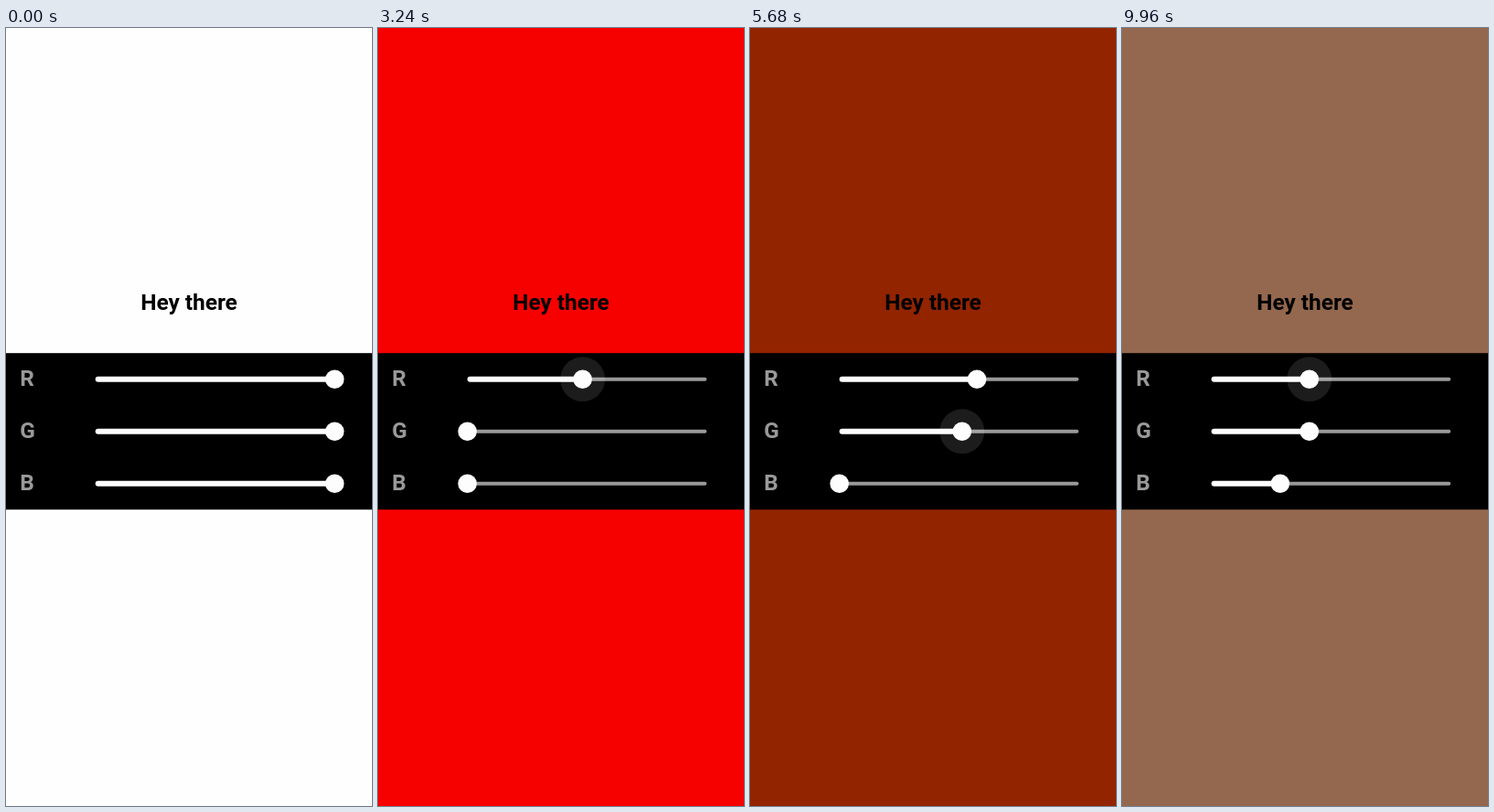
Animation of 400x850 px, one loop 10000 ms. Source, as an HTML page:

```html
<!DOCTYPE html>
<html lang="en">
<head>
<meta charset="utf-8">
<title>Colour sliders</title>
<style>
  html, body { margin: 0; width: 100%; height: 100%; overflow: hidden; }
  svg { display: block; width: 100vw; height: 100vh; }
  text { font: 700 24.4px Roboto, sans-serif; }
  .label { fill: #999; }
  .rail { stroke: #999; stroke-width: 4; stroke-linecap: round; }
  .fill { stroke: #fdfdfd; stroke-width: 6; stroke-linecap: round; }
  .thumb { fill: #fdfdfd; }
  .halo { fill: #fff; }
</style>
</head>
<body>
<svg id="stage" viewBox="0 0 400 850">
  <rect id="back" width="400" height="850"/>
  <text x="200" y="307.7" text-anchor="middle">Hey there</text>
  <rect y="355.2" width="400" height="171"/>
</svg>
<script>
const LOOP = 10000, STEP = 40;
const LEFT = 97.7, SPAN = 261.5, TOP = 383.7, ROW = 57;
const FULL = 254;
const LAG = 380;              // the backdrop settles this long after the thumb
const HOLD = 120, FADE = 80;  // halo after a drag
const TAP = 100;              // shorter touches show no halo

const drags = [
  { on: 'B', at: 1040, dur: 430, to: 0 },
  { on: 'G', at: 2080, dur: 600, to: 0 },
  { on: 'R', at: 3160, dur: 370, to: 0 },
  { on: 'R', at: 4640, dur: 560, to: 146 },
  { on: 'G', at: 5392, dur: 490, to: 140 },
  { on: 'B', at: 6240, dur: 560, to: 202 },
  { on: 'G', at: 7160, dur: 560, to: 34 },
  { on: 'R', at: 8190, dur: 40, to: 190 },
  { on: 'G', at: 8720, dur: 400, to: 104 },
  { on: 'B', at: 9274, dur: 400, to: 73 },
  { on: 'R', at: 9580, dur: 380, to: 104 }
];

const stage = document.getElementById('stage');
const back = document.getElementById('back');
const clamp = x => Math.max(0, Math.min(1, x));
const easeOut = p => 1 - (1 - p) ** 3;
const easeInOut = p => p * p * (3 - 2 * p);

function set(node, attrs) {
  for (const key in attrs) node.setAttribute(key, attrs[key]);
}

function add(tag, attrs) {
  const node = document.createElementNS('http://www.w3.org/2000/svg', tag);
  set(node, attrs);
  return stage.appendChild(node);
}

function level(moves, t, ease, lag) {
  return moves.reduce((value, { at, dur, to }) =>
    value + (to - value) * ease(clamp((t - at) / (dur + lag))), FULL);
}

function pressure(moves, t) {
  return Math.max(...moves.filter(m => m.dur > TAP).map(({ at, dur }) =>
    Math.min(clamp((t - at) / FADE), clamp((at + dur + HOLD + FADE - t) / FADE))));
}

const channels = [...'RGB'].map((name, i) => {
  const y = TOP + ROW * i;
  add('text', { class: 'label', x: 15.3, y: y + 7.6 }).textContent = name;
  add('line', { class: 'rail', x1: LEFT + 2, x2: LEFT + SPAN - 2, y1: y, y2: y });
  return {
    moves: drags.filter(d => d.on === name),
    bar: add('line', { class: 'fill', x1: LEFT + 3, y1: y, y2: y }),
    halo: add('circle', { class: 'halo', cy: y, r: 24.4 }),
    knob: add('circle', { class: 'thumb', cy: y, r: 10.3 })
  };
});

function draw(t) {
  const rgb = channels.map(({ moves, bar, halo, knob }) => {
    const x = LEFT + SPAN * level(moves, t, easeOut, 0) / FULL;
    set(bar, { x2: Math.max(LEFT + 3, x) });
    set(knob, { cx: x });
    set(halo, { cx: x, opacity: 0.11 * pressure(moves, t) });
    return Math.round(level(moves, t, easeInOut, LAG));
  });
  back.setAttribute('fill', `rgb(${rgb})`);
}

const start = performance.now();
function tick() {
  const t = (performance.now() - start) % LOOP;
  draw(Math.floor(t / STEP) * STEP);
  requestAnimationFrame(tick);
}
tick();
</script>
</body>
</html>
```
